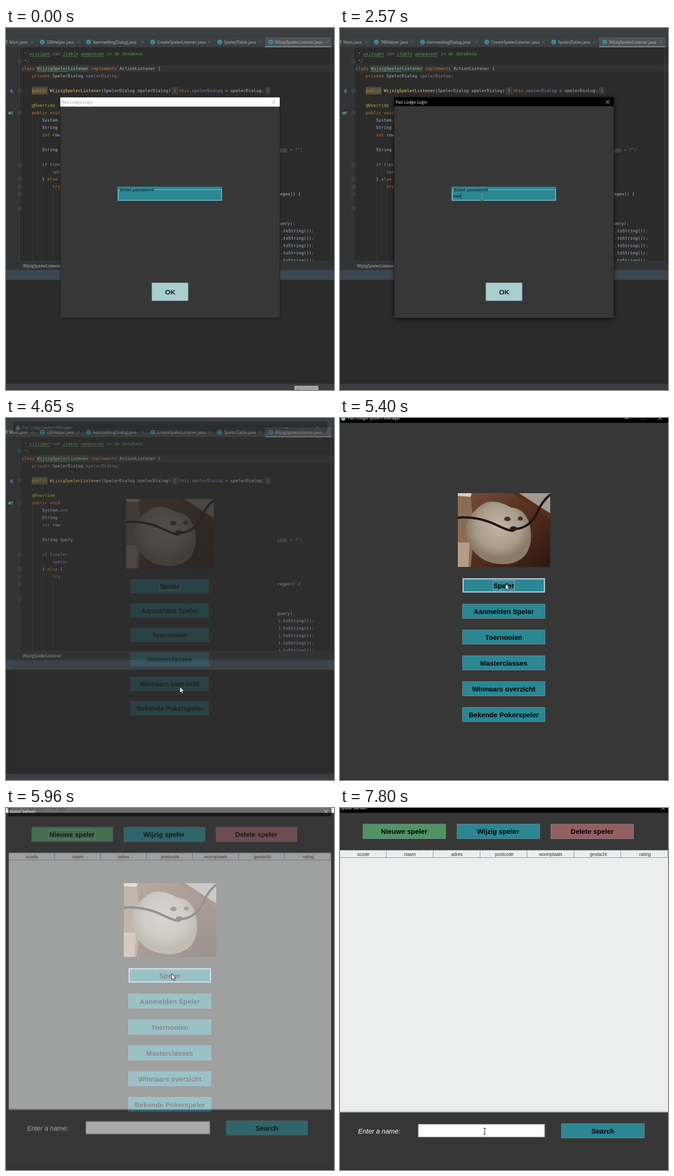
An HTML page that plays this animation: 713 px wide and 785 px high, repeating every 8 s.

```html
<!DOCTYPE html>
<html lang="nl">
<head>
<meta charset="utf-8">
<title>Speler beheer</title>
<style>
html, body { margin: 0; width: 100%; height: 100%; overflow: hidden; background: #2b2b2b; }
svg { display: block; }
.ui { font: 8.9px "Open Sans", "Noto Sans", sans-serif; fill: #bbb; }
.code { font: 9.3px "DejaVu Sans Mono", monospace; fill: #a9b7c6; }
.k { fill: #cc7832; }
.f { fill: #9876aa; }
.s { fill: #6a8759; }
.m { fill: #ffc66d; }
.doc { fill: #629755; font-style: italic; }
.b { font: bold 15px "Liberation Sans", Arial, sans-serif; text-anchor: middle; fill: #000; }
.th { font: 10px "Liberation Sans", Arial, sans-serif; text-anchor: middle; fill: #333; }
.btn { fill: #2a8793; stroke: #7a8a99; }
.line { fill: none; stroke-width: 1; }
.focus { fill: none; stroke: #a3b8cc; }
.hover { fill: none; stroke: #b8cfe5; stroke-width: 2; }

/* every clip runs on the same 8 s clock */
.anim { animation: 8s linear infinite; }
.step { animation: 8s step-end infinite; }

#tip { animation-name: tip; }
@keyframes tip { 0% { opacity: 1 } 1.75%, 100% { opacity: 0 } }

.active { animation-name: active; }
@keyframes active { 0%, 15.6% { opacity: 0 } 17.875%, 100% { opacity: 1 } }

#typed { animation-name: typed; }
@keyframes typed {
  0% { transform: none }
  28% { transform: translateX(5.6px) }
  29.625% { transform: translateX(11.2px) }
  32.125% { transform: translateX(16.8px) }
  34.625% { transform: translateX(22.4px) }
  36.25% { transform: translateX(28px) }
  37.875% { transform: translateX(33.6px) }
  39.5% { transform: translateX(39.2px) }
  42%, 100% { transform: translateX(44.8px) }
}
#caret { animation-name: caret; }
@keyframes caret {
  0% { opacity: 0 } 17.875% { opacity: 1 } 22.875% { opacity: 0 }
  28% { opacity: 1 } 47%, 100% { opacity: 0 }
}
#ok-hover { animation-name: ok-hover; }
@keyframes ok-hover { 0% { opacity: 0 } 51.5%, 100% { opacity: 1 } }
#ok { fill: #a8cfcf; animation-name: ok; }
@keyframes ok { 0% { fill: #a8cfcf } 54.875% { fill: #b8cfe5 } 55.75%, 100% { fill: #a8cfcf } }

#login { transform-origin: 356px 390px; animation-name: login; }
@keyframes login {
  0%, 55.75% { opacity: 1; transform: none }
  57.375%, 100% { opacity: 0; transform: scale(.92) }
}
#main { transform-origin: 356px 390px; animation-name: main; }
@keyframes main {
  0%, 57.375% { opacity: 0; transform: scale(.9) }
  58.25% { opacity: .3; transform: scale(.953) }
  59.125% { opacity: .58; transform: scale(.98) }
  60% { opacity: .8; transform: scale(.991) }
  60.75% { opacity: .94; transform: scale(.996) }
  61.625%, 100% { opacity: 1; transform: none }
}
#players { transform-origin: 348px 375px; animation-name: players; }
@keyframes players {
  0%, 72.75% { opacity: 0; transform: scale(.9) }
  73.625% { opacity: .3; transform: scale(.953) }
  74.5% { opacity: .577; transform: scale(.98) }
  75.375% { opacity: .8; transform: scale(.991) }
  76.125% { opacity: .94; transform: scale(.996) }
  77%, 100% { opacity: 1; transform: none }
}
#inactive { animation-name: inactive; }
@keyframes inactive { 0% { opacity: 0 } 72.75%, 100% { opacity: 1 } }
#speler { animation-name: speler; }
@keyframes speler { 0% { fill: #2a8793 } 71.875% { fill: #b8cfe5 } 72.75%, 100% { fill: #2a8793 } }
#speler-hover { animation-name: speler-hover; }
@keyframes speler-hover { 0% { opacity: 0 } 66.2%, 100% { opacity: 1 } }
#speler-focus { animation-name: speler-focus; }
@keyframes speler-focus { 0% { opacity: 1 } 72.75%, 100% { opacity: 0 } }
#new-focus { animation-name: new-focus; }
@keyframes new-focus { 0% { opacity: 1 } 91.625%, 100% { opacity: 0 } }
#name-caret { animation-name: name-caret; }
@keyframes name-caret { 0% { opacity: 0 } 91.625% { opacity: 1 } 97.5%, 100% { opacity: 0 } }

.pointer { animation: move 8s linear infinite, 8s step-end infinite; }
#arrow { animation-name: move, arrow; }
#beam { animation-name: move, beam; mix-blend-mode: difference; }
@keyframes arrow {
  0% { opacity: 1 } 13% { opacity: 0 } 47.3% { opacity: 1 } 89.875%, 100% { opacity: 0 }
}
@keyframes beam {
  0% { opacity: 0 } 13% { opacity: 1 } 47.3% { opacity: 0 } 89.875%, 100% { opacity: 1 }
}
@keyframes move {
  0%, .8% { transform: translate(650px, 792px) }
  3% { transform: translate(560px, 690px) }
  6% { transform: translate(420px, 520px) }
  8% { transform: translate(350px, 440px) }
  10.125% { transform: translate(323px, 411px) }
  12.5% { transform: translate(312px, 378px) }
  14.5%, 46.2% { transform: translate(308.5px, 367px) }
  47% { transform: translate(310px, 374px) }
  49.5% { transform: translate(345px, 480px) }
  52.25%, 60.5% { transform: translate(378px, 583px) }
  62.5% { transform: translate(370px, 500px) }
  64.875% { transform: translate(362px, 387px) }
  67.5%, 79% { transform: translate(360px, 359.5px) }
  82% { transform: translate(345px, 470px) }
  85.5% { transform: translate(310px, 690px) }
  87% { transform: translate(308px, 740px) }
  89% { transform: translate(312px, 697px) }
  90.5%, 100% { transform: translate(314.5px, 701px) }
}
</style>
</head>
<body>
<svg width="713" height="785" viewBox="0 0 713 785">
  <defs>
    <pattern id="wave" width="4" height="3" patternUnits="userSpaceOnUse">
      <path d="M0 2L1 1L2 1L3 2L4 2" fill="none" stroke="#659c6b" stroke-width=".8"/>
    </pattern>
    <linearGradient id="floor" x2="1" y2="1">
      <stop stop-color="#75503b"/><stop offset=".5" stop-color="#55301f"/><stop offset="1" stop-color="#2c1710"/>
    </linearGradient>
    <radialGradient id="fur" cy=".4">
      <stop stop-color="#c2b6a6"/><stop offset=".7" stop-color="#a99b8a"/><stop offset="1" stop-color="#8a7a69"/>
    </radialGradient>
    <clipPath id="frame"><path d="M256 163h201v160h-201z"/></clipPath>
    <g id="fold">
      <path d="M-3.5 -3.5h7v7h-7z" fill="#2b2b2b" stroke="#606366" stroke-width=".8"/>
      <path d="M-2 0h4" stroke="#7d8083"/>
    </g>
    <g id="cls">
      <circle r="5.3" fill="#3f8ca8"/>
      <text y="3" text-anchor="middle" style="font:8px 'Open Sans',sans-serif" fill="#20343d">C</text>
    </g>
    <path id="x" d="M-2.5 -2.5l5 5m0 -5l-5 5" stroke="#777a7d" stroke-width=".9"/>
    <path id="close" d="M-4 -4l8 8m0 -8l-8 8"/>
    <text id="str" x="591.4">).toString())<tspan class="k">;</tspan></text>
  </defs>

  <!-- editor -->
  <g id="editor">
    <path d="M0 0h713v785h-713z" fill="#2b2b2b"/>
    <path d="M0 41h29.5v464h-29.5z" fill="#313335"/>
    <path d="M34 80h679v16h-679z" fill="#323232"/>
    <path d="M29.5 41v464M706.5 41v464" stroke="#4b4d4f" stroke-width=".8"/>
    <path d="M57.5 192v313M79.5 304v201M102.5 352v153" stroke="#383a3b"/>
    <path d="M67 80.5h113v15h-113z" fill="#344134"/>
    <path d="M56 128h34v16h-34z" fill="#52503a"/>
    <path d="M360 128h15v16h-15zM563 128h12v16h-12z" fill="#3a3b3c"/>
    <g class="code">
      <text class="doc" x="34" y="43">/**</text>
      <text class="doc" x="39.6" y="59">* wijzigen van jtable aanpassen in de database</text>
      <text class="doc" x="39.6" y="75">*/</text>
      <text x="34" y="91"><tspan class="k">class</tspan> WijzigSpelerListener <tspan class="k">implements</tspan> ActionListener {</text>
      <text x="56" y="107"><tspan class="k">private</tspan> SpelerDialog <tspan class="f">spelerDialog</tspan><tspan class="k">;</tspan></text>
      <text x="56" y="139"><tspan class="k">public</tspan> <tspan class="m">WijzigSpelerListener</tspan>(SpelerDialog spelerDialog)</text>
      <text x="364.5" y="139" fill="#8c8c8c">{</text>
      <text x="376" y="139"><tspan class="k">this</tspan>.<tspan class="f">spelerDialog</tspan> = spelerDialog<tspan class="k">;</tspan></text>
      <text x="566.5" y="139" fill="#8c8c8c">}</text>
      <text x="56" y="171" fill="#bbb529">@Override</text>
      <text class="k" x="56" y="187">public void</text>
      <text x="78.5" y="203">System.<tspan class="f">out</tspan></text>
      <text x="78.5" y="219">String</text>
      <text x="78.5" y="235"><tspan class="k">int</tspan> row</text>
      <text x="78.5" y="267">String query</text>
      <text x="78.5" y="299"><tspan class="k">if</tspan> (<tspan class="f">speler</tspan></text>
      <text class="f" x="101" y="315">speler</text>
      <text x="78.5" y="331">} <tspan class="k">else</tspan> {</text>
      <text class="k" x="101" y="347">try</text>
      <text x="588.9" y="267"><tspan class="s">code = ?"</tspan><tspan class="k">;</tspan></text>
      <text x="590" y="363">regex)) {</text>
      <text x="589.2" y="427">query)<tspan class="k">;</tspan></text>
      <use href="#str" y="443"/><use href="#str" y="459"/><use href="#str" y="475"/>
      <use href="#str" y="491"/><use href="#str" y="507"/>
      <text x="9" y="139">@</text>
    </g>
    <g fill="url(#wave)">
      <path d="M51 60h45v3h-45zM124 60h33v3h-33zM163 60h50v3h-50zM67 92h67v3h-67zM589 268h22v3h-22z"/>
    </g>
    <use href="#fold" x="29.5" y="72"/><use href="#fold" x="29.5" y="136"/>
    <use href="#fold" x="29.5" y="184"/><use href="#fold" x="29.5" y="296"/>
    <use href="#fold" x="29.5" y="328"/><use href="#fold" x="29.5" y="344"/>
    <use href="#fold" x="29.5" y="360"/><use href="#fold" x="29.5" y="392"/>
    <circle cx="8.5" cy="184.500" r="3.3" fill="#4c9a4c"/>
    <path d="M13.500 188v-7m-1.500 2l1.500 -2l1.500 2" fill="none" stroke="#a0a8a0" stroke-width=".9"/>

    <path d="M0 0h713v41h-713z" fill="#3c3f41"/>
    <path d="M0 18.500h713M0 41.500h713" stroke="#323232"/>
    <path d="M563 20h144v21h-144z" fill="#4e5254"/>
    <path d="M563 39h144v3h-144z" fill="#747a80"/>
    <circle cx="-1" cy="30" r="4.500" fill="#4c9a4c"/>
    <use href="#cls" x="79" y="30.500"/><use href="#cls" x="179.500" y="30.500"/>
    <use href="#cls" x="319" y="30.500"/><use href="#cls" x="464.500" y="30.500"/>
    <use href="#cls" x="575.500" y="30.500"/>
    <g class="ui">
      <text x="7" y="34">Main.java</text>
      <text x="89" y="34">DBHelper.java</text>
      <text x="189" y="34">AanmeldingDialog.java</text>
      <text x="328.500" y="34">CreateSpelerListener.java</text>
      <text x="474" y="34">SpelerJTable.java</text>
      <text x="585" y="34">WijzigSpelerListener.java</text>
    </g>
    <use href="#x" x="57" y="30.500"/><use href="#x" x="157" y="30.500"/>
    <use href="#x" x="297" y="30.500"/><use href="#x" x="442" y="30.500"/>
    <use href="#x" x="553" y="30.500"/><use href="#x" x="698" y="30.500"/>

    <path d="M0 505h713v20h-713z" fill="#313335"/>
    <path d="M0 505.500h713" stroke="#3a3c3e"/>
    <text class="ui" x="37" y="519">WijzigSpelerListener</text>
    <path d="M0 525h713v21h-713z" fill="#3d4752"/>
    <path d="M0 771h713v14h-713z" fill="#3c3f41"/>
    <path d="M0 771.500h713" stroke="#323537"/>
    <g id="tip" class="step">
      <path d="M627.500 776.500h51v12h-51z" fill="#a2a3a4" stroke="#b4b5b6"/>
      <text class="ui" x="632" y="790" style="fill:#444">Console</text>
    </g>
  </g>

  <!-- login dialog -->
  <g id="login" class="anim">
    <path d="M118 150h477v479h-477z" fill="#373737" style="filter:drop-shadow(0 1px 2px #0006)"/>
    <path class="anim active" d="M118 150h477v479h-477z" fill="#373737" style="filter:drop-shadow(0 3px 6px #0009)"/>
    <path d="M118 150.500h477v20h-477z" fill="#fff"/>
    <text class="ui" x="121" y="163.500" style="fill:#999">Pair Lodge Login</text>
    <use href="#close" x="582" y="160.500" stroke="#999"/>
    <g class="anim active">
      <path d="M118 150h477v20.500h-477z" fill="#000"/>
      <text class="ui" x="121" y="163.500" style="fill:#fff">Pair Lodge Login</text>
      <use href="#close" x="582" y="160.500" stroke="#fff"/>
    </g>
    <path class="line" d="M118.500 170v458.500h476v-458.500" stroke="#2a2a2a"/>

    <path d="M242 344h228v31h-228z" fill="#2a8793"/>
    <path class="line" d="M246.500 350.500h-2v23h224v-23h-146" stroke="#a9cdd5"/>
    <text x="248" y="354" style="font:bold 9.75px 'Liberation Sans',Arial,sans-serif" fill="#27333d">Enter password</text>
    <path d="M249.200 365h40" stroke="#26323a" stroke-width="4.700" stroke-linecap="round" stroke-dasharray="0 5.6"/>
    <g id="typed" class="step">
      <path d="M246.200 358h60v13h-60z" fill="#2a8793"/>
      <path id="caret" class="step" d="M246 358h1v13h-1z" fill="#1d2a30"/>
    </g>

    <path id="ok" class="step" d="M317 552.500h79v39h-79z" stroke="#7a8a99"/>
    <path id="ok-hover" class="step hover" d="M317.500 553h78.500v38.500h-78.500z" style="stroke-width:1.500"/>
    <text class="b" x="357" y="577.500" style="fill:#1a1a1a">OK</text>
  </g>

  <!-- main window -->
  <g id="main" class="anim">
    <path d="M-4 -14h722v802h-722z" fill="#373737"/>
    <path d="M-4 -14h722v24.500h-722z" fill="#000"/>
    <path d="M0 784.500h713" stroke="#222"/>
    <circle cx="7" cy="1" r="5" fill="#8fb3bd"/>
    <text class="ui" x="17" y="3.200" style="fill:#fff">Pair Lodge System Manager</text>
    <path class="line" d="M619 .500h9" stroke="#fff"/>
    <path class="line" d="M655.500 -4.500h7.500v8h-7.500z" stroke="#444"/>
    <use href="#close" x="696" y="0" stroke="#fff"/>
    <g id="inactive" class="step">
      <path d="M-4 -14h722v24.500h-722z" fill="#fff"/>
      <circle cx="7" cy="1" r="5" fill="#8fb3bd"/>
      <text class="ui" x="17" y="3.200" style="fill:#999">Pair Lodge System Manager</text>
    </g>

    <g clip-path="url(#frame)">
      <path d="M256 163h201v160h-201z" fill="url(#floor)"/>
      <path d="M256 170l28 -2l8 80l-8 75h-28z" fill="#8b6c56"/>
      <path d="M256 270h26l-3 53h-23z" fill="#b59c86"/>
      <path d="M256 163h30l-2 8l-28 -2z" fill="#d9cdbb"/>
      <path d="M385 163h72v44z" fill="#a29a90"/>
      <path d="M375 163h14l68 44v12z" fill="#5b2d1b"/>
      <path d="M320 182Q345 178 372 194Q402 196 412 230Q422 268 404 296Q385 318 352 317Q312 316 290 288Q268 256 276 226Q290 196 320 182Z" fill="url(#fur)"/>
      <path d="M256 216Q300 213 340 232T378 241Q412 240 429 205Q438 182 457 166" fill="none" stroke="#1c1614" stroke-width="5"/>
      <ellipse cx="364" cy="219" rx="7" ry="5" fill="#40342d"/>
      <ellipse cx="392" cy="218" rx="5.500" ry="4.500" fill="#40342d"/>
      <ellipse cx="377" cy="240" rx="8" ry="5" fill="#2a1d19"/>
    </g>

    <path id="speler" class="btn step" d="M266.500 347.500h179v31h-179z"/>
    <path id="speler-hover" class="step hover" d="M268 349h176v28h-176z"/>
    <path class="btn" d="M266.500 403.500h179v31h-179zm0 56h179v31h-179zm0 56h179v31h-179zm0 56h179v31h-179zm0 56h179v31h-179z"/>
    <path id="speler-focus" class="step focus" d="M332.500 352.500h47v20.500h-47z"/>
    <g class="b">
      <text x="356" y="368.500">Speler</text>
      <text x="356" y="424.500">Aanmelden Speler</text>
      <text x="356" y="480.500">Toernooien</text>
      <text x="356" y="536.500">Masterclasses</text>
      <text x="356" y="592.500">Winnaars overzicht</text>
      <text x="356" y="648.500">Bekende Pokerspeler</text>
    </g>
  </g>

  <!-- player dialog -->
  <g id="players" class="anim">
    <path d="M-2 -14h717v802h-717z" fill="#373737"/>
    <path d="M-2 -14h717v24.500h-717z" fill="#000"/>
    <path d="M0 784.500h713" stroke="#222"/>
    <text class="ui" x="1" y="3.200" style="fill:#fff">Speler beheer</text>
    <use href="#close" x="702.500" y="0" stroke="#fff"/>
    <path class="btn" d="M50 35h179.500v31.500h-179.500z" style="fill:#509466"/>
    <path class="btn" d="M254.500 35h179.500v31.500h-179.500z"/>
    <path class="btn" d="M458.500 35h179.500v31.500h-179.500z" style="fill:#955f61"/>
    <path id="new-focus" class="step focus" d="M88.500 40.500h101.500v20.500h-101.500z"/>
    <g class="b">
      <text x="139.500" y="56">Nieuwe speler</text>
      <text x="343.500" y="56">Wijzig speler</text>
      <text x="548" y="56">Delete speler</text>
      <text x="571.500" y="706">Search</text>
    </g>
    <path d="M-1 91h715v568h-715z" fill="#eceeee"/>
    <path class="line" d="M-1 91.500h715M-1 107.500h715M100.500 91v16m102 -16v16m102 -16v16m102 -16v16m102 -16v16m102 -16v16m102 -16v16" stroke="#7a8a99"/>
    <path class="line" d="M-1 658.500h715" stroke="#8a98a4"/>
    <path class="line" d="M-1 659.500h715" stroke="#dfe4e8"/>
    <g class="th">
      <text x="50.500" y="103.500">scode</text>
      <text x="152" y="103.500">naam</text>
      <text x="254" y="103.500">adres</text>
      <text x="357" y="103.500">postcode</text>
      <text x="458" y="103.500">woonplaats</text>
      <text x="561.500" y="103.500">geslacht</text>
      <text x="663" y="103.500">rating</text>
    </g>
    <text x="39.500" y="706" style="font:italic 14.6px 'Liberation Sans',Arial,sans-serif" fill="#fff">Enter a name:</text>
    <path d="M170 685.500h275.500v28.500h-275.500z" fill="#b4bac0"/>
    <path d="M170.500 686.500h273v26h-273z" fill="#fff"/>
    <path class="line" d="M170 714v-28.500h275" stroke="#7a8a99"/>
    <path id="name-caret" class="step" d="M171 689h1v21h-1z" fill="#000"/>
    <path class="btn" d="M481.500 684.500h180v31h-180z"/>
    <text class="b" x="571.500" y="706">Search</text>
  </g>

  <path id="beam" class="pointer" d="M-3 -6.500h2.300q.7 0 .7 .7q0 -.7 .7 -.7h2.300M0 -6v12M-3 6.500h2.300q.7 0 .7 -.7q0 .7 .7 .7h2.300" fill="none" stroke="#fff"/>
  <path id="arrow" class="pointer" d="M0 0V13L3 10.300L5 15L7.200 14L5.200 9.500H9.300Z" fill="#fff" stroke="#000" stroke-width=".9"/>
</svg>
</body>
</html>
```
